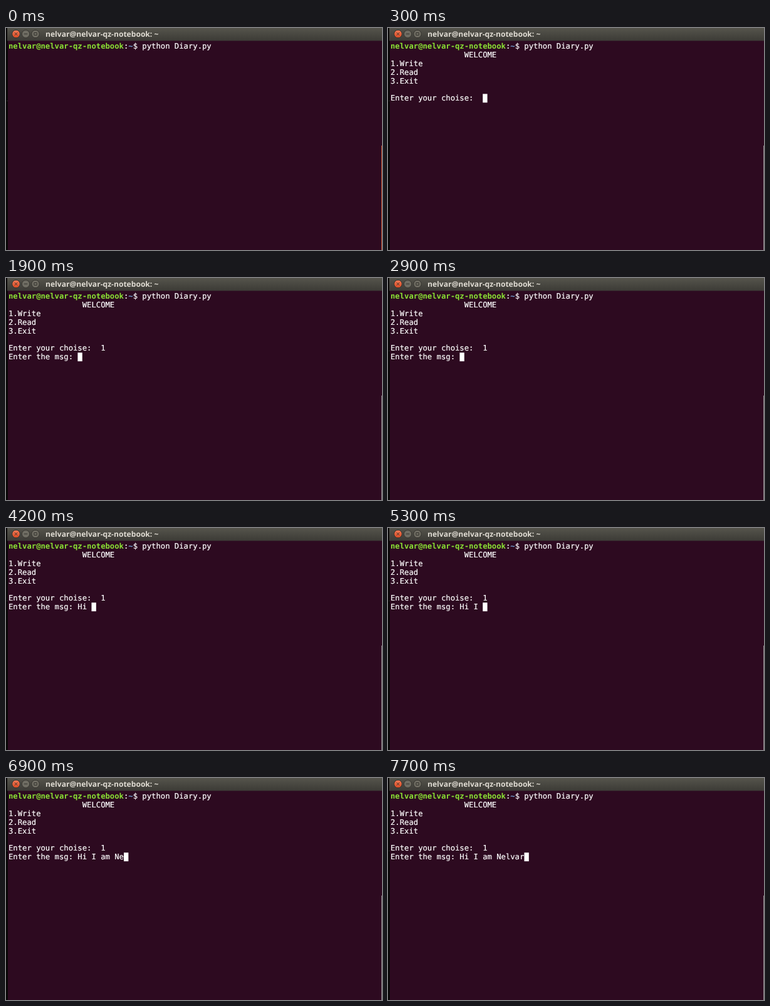
An HTML page for the animation above (8 s loop, 600 by 355 pixels).

```html
<!DOCTYPE html>
<html lang="en">
<head>
<meta charset="utf-8">
<title>Terminal diary</title>
<style>
  html, body { margin: 0; width: 100%; height: 100%; overflow: hidden; background: #2d0a20; }
  svg { display: block; width: 600px; height: 355px; }
  text { white-space: pre; text-rendering: geometricPrecision; }
  .title { font: bold 12.08px "Noto Sans", sans-serif; fill: #dfdbd2; }
  .term { font: 12.23px "DejaVu Sans Mono", monospace; fill: #fff; stroke: #fff; stroke-width: .2; }
  .user { font-weight: bold; fill: #8ae234; stroke: none; }
  .path { font-weight: bold; fill: #729fcf; stroke: none; }
</style>
</head>
<body>
<svg viewBox="0 0 600 355">
  <defs>
    <linearGradient id="bar" x2="0" y2="1">
      <stop stop-color="#55544c"/>
      <stop offset="1" stop-color="#3c3b36"/>
    </linearGradient>
    <linearGradient id="close" x2="0" y2="1">
      <stop stop-color="#f37b58"/>
      <stop offset="1" stop-color="#dc4a22"/>
    </linearGradient>
  </defs>
  <rect width="600" height="355" fill="#2d0a20"/>
  <rect width="3" height="355" fill="#080607"/>
  <rect x="1" y="116" width="2" height="1" fill="#222"/>
  <rect x="2" width="598" height="20.5" fill="url(#bar)"/>
  <rect id="scrollbar" x="599" y="188" width="1" height="167"/>
  <g stroke="#34332e" stroke-width="1">
    <circle cx="16" cy="9.5" r="6.3" fill="url(#close)"/>
    <circle cx="31.5" cy="9.5" r="6.2" fill="#6e6c62"/>
    <circle cx="47" cy="9.5" r="6.2" fill="#6e6c62"/>
    <path d="M13.8 7.3l4.4 4.4m0-4.4l-4.4 4.4M28.8 9.5h5.4M44.8 7.5h4.4v4h-4.4z" fill="none"/>
  </g>
  <text class="title" x="63" y="14">nelvar@nelvar-qz-notebook: ~</text>
  <text class="term" x="4" y="33"><tspan class="user">nelvar@nelvar-qz-notebook</tspan>:<tspan class="path">~</tspan>$ python Diary.py</text>
  <g id="output" class="term"></g>
  <rect id="cursor" width="7.35" height="13.9" fill="#fff"/>
</svg>
<script>
const LOOP = 8000, LEFT = 4, TOP = 22, CELL = 7.36, LINE = 13.9;
const MENU = [" ".repeat(16) + "WELCOME", "1.Write", "2.Read", "3.Exit", ""];
const CHOICE = "Enter your choise:  ";
const PROMPT = "Enter the msg: ";
const MESSAGE = "Hi I am Nelvar";

// Time at which each character of the message is typed
const keyTimes = [3500, 3900, 4200, 5100, 5300, 5500, 5600, 5700, 6500, 6900, 7100, 7400, 7500, 7700];
// Spans in which the cursor is hidden
const hidden = [[0, 200], [800, 1300], [2500, 2900], [4700, 5000], [6400, 6500]];

const output = document.getElementById("output");
const cursor = document.getElementById("cursor");
const scrollbar = document.getElementById("scrollbar");

const rows = Array.from({ length: 7 }, (_, i) => {
  const row = document.createElementNS("http://www.w3.org/2000/svg", "text");
  row.setAttribute("x", LEFT);
  row.setAttribute("y", TOP + 11 + (i + 1) * LINE);
  return output.appendChild(row);
});

function linesAt(t) {
  if (t < 300) return [""];
  const lines = [...MENU, CHOICE + (t < 1300 ? "" : "1")];
  if (t >= 1900) lines.push(PROMPT + MESSAGE.slice(0, keyTimes.filter(k => k <= t).length));
  return lines;
}

function draw() {
  const t = performance.now() % LOOP;
  const lines = linesAt(t);
  rows.forEach((row, i) => {
    const line = lines[i] || "";
    if (row.textContent !== line) row.textContent = line;
  });
  cursor.setAttribute("x", LEFT + lines.at(-1).length * CELL);
  cursor.setAttribute("y", TOP + lines.length * LINE);
  cursor.style.display = hidden.some(([from, to]) => t >= from && t < to) ? "none" : "";
  scrollbar.setAttribute("fill", t < 200 ? "#d2623c" : "#958f91");
  requestAnimationFrame(draw);
}
draw();
</script>
</body>
</html>
```
